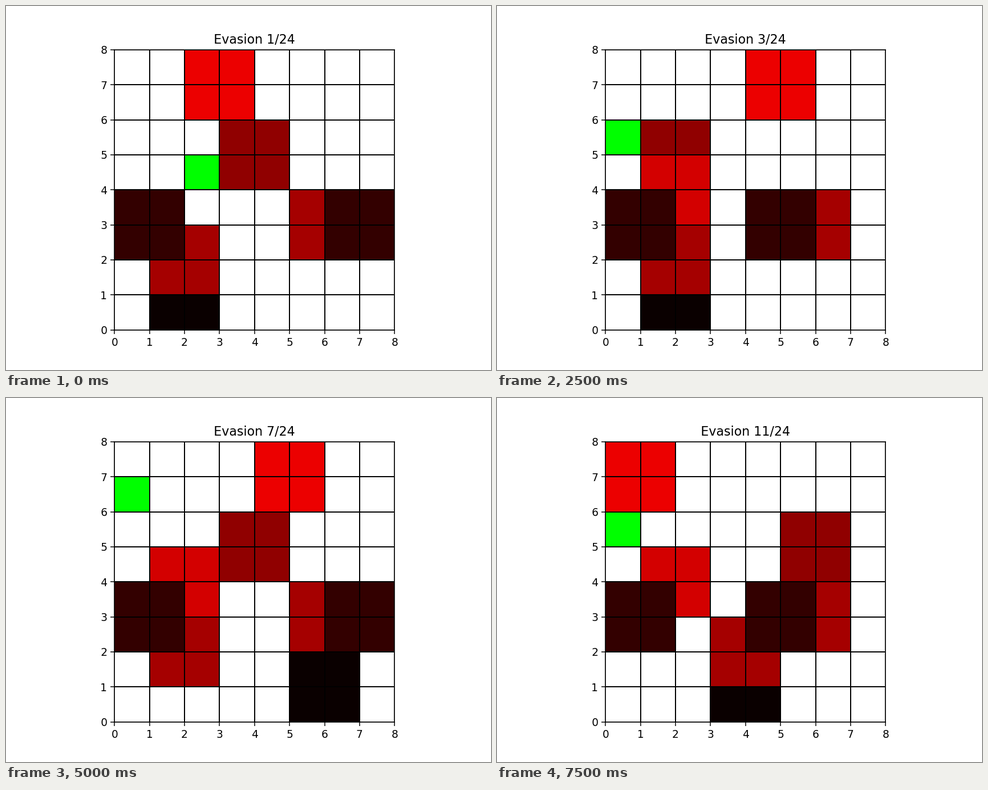
A matplotlib script for the animation above (8000 ms loop, 864 by 648 pixels).

```python
import numpy as np
import matplotlib.pyplot as plt
from matplotlib.animation import FuncAnimation

SIZE = 8
TICK_MS = 500
TOTAL_STEPS = 24

# Simulation step shown at each tick; the player may move several times per step.
STEPS = [1, 1, 2, 2, 2, 3, 3, 4, 5, 6, 7, 8, 9, 10, 10, 11]

# Tick at which the player reaches each cell.
PLAYER = {0: (2, 4), 1: (1, 4), 3: (1, 5), 4: (0, 5), 6: (0, 6), 14: (0, 5)}


def bounce(lo, hi, phase):
    """Position that runs back and forth between lo and hi, one cell a step."""
    span = hi - lo

    def at(step):
        k = (step - 1 + phase) % (2 * span)
        return lo + min(k, 2 * span - k)
    return at


def fixed(value):
    return lambda step: value


# (red level, x, y) of each 2x2 block, bottom layer first
BLOCKS = [
    (10, bounce(0, 6, 11), fixed(0)),
    (236, bounce(0, 6, 2), fixed(6)),
    (144, bounce(0, 6, 9), fixed(4)),
    (211, fixed(1), bounce(1, 5, 0)),
    (165, bounce(0, 3, 5), fixed(1)),
    (165, fixed(5), bounce(1, 3, 3)),
    (51, fixed(0), fixed(2)),
    (51, bounce(3, 6, 3), fixed(2)),
]


def board(tick):
    step = STEPS[tick]
    cells = np.ones((SIZE, SIZE, 3))
    for red, fx, fy in BLOCKS:
        x, y = fx(step), fy(step)
        cells[y:y + 2, x:x + 2] = (red / 255, 0, 0)
    x, y = PLAYER[max(t for t in PLAYER if t <= tick)]
    cells[y, x] = (0, 1, 0)
    return cells


fig, ax = plt.subplots(figsize=(6.4, 4.8), dpi=135)
edges = np.arange(SIZE + 1)
mesh = ax.pcolormesh(edges, edges, board(0), edgecolors="k", linewidth=1)
ax.set_aspect("equal")
ax.set_xticks(edges)
ax.set_yticks(edges)
title = ax.set_title("")


def update(tick):
    mesh.set_array(board(tick))
    title.set_text(f"Evasion {STEPS[tick]}/{TOTAL_STEPS}")
    return mesh, title


anim = FuncAnimation(fig, update, frames=len(STEPS), interval=TICK_MS,
                     repeat=True, repeat_delay=0, blit=False)
plt.show()
```
